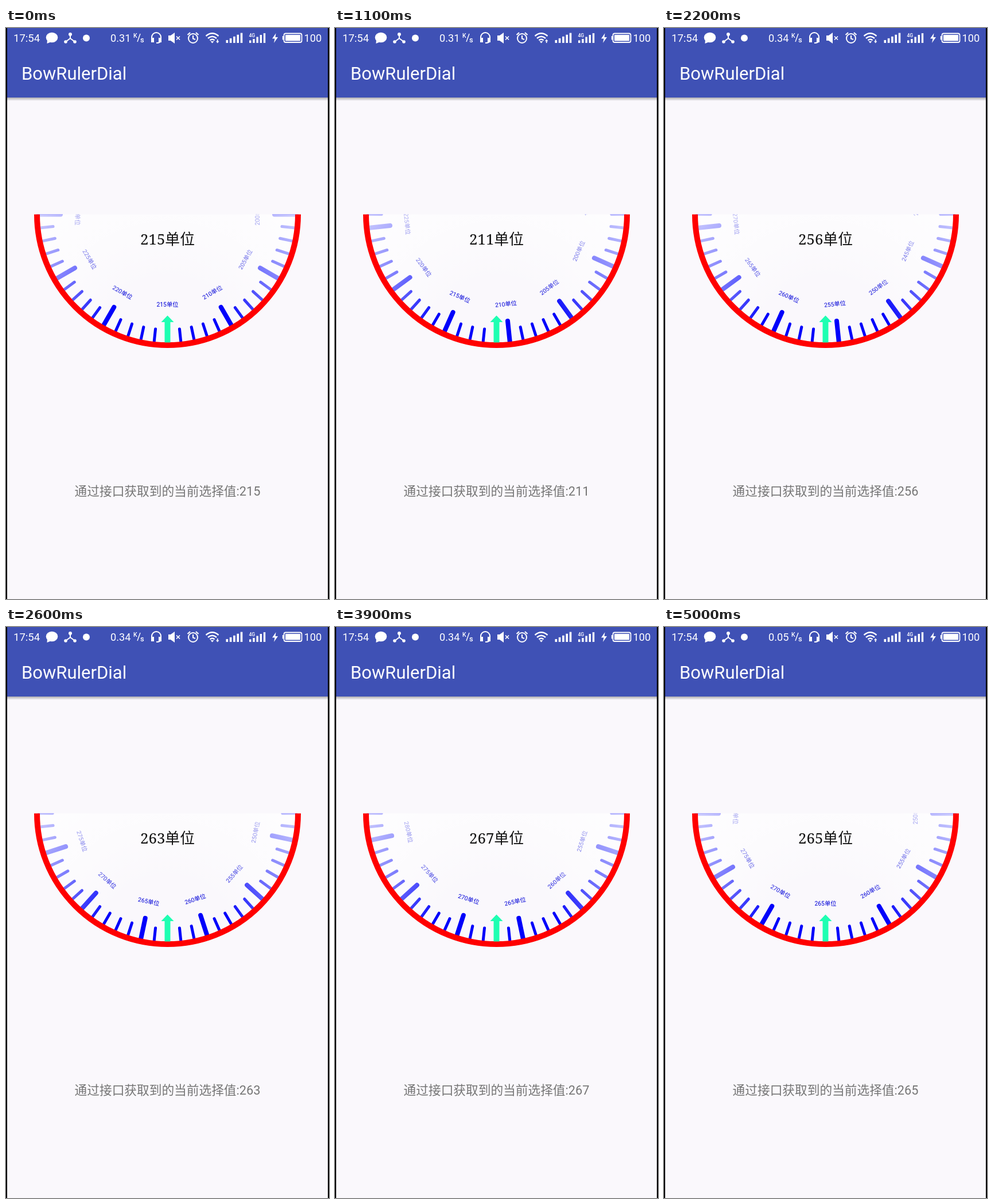
Write an HTML page with a canvas that moves like this. It is 563x994 px and loops after 5100 ms.

```html
<!DOCTYPE html>
<html lang="zh">
<head>
<meta charset="utf-8">
<style>
  html, body { margin: 0; width: 100%; height: 100%; overflow: hidden; background: #000; }
  canvas { display: block; }
</style>
</head>
<body>
<canvas id="stage" width="563" height="994"></canvas>
<script>
const ctx = document.getElementById('stage').getContext('2d');
const LOOP = 5100, CX = 281.5, CY = 324.5, RADIUS = 232.5, UNIT = '单位';
const SANS = 'Roboto, "Noto Sans CJK SC", "Noto Sans CJK", sans-serif';
const SERIF = '"Noto Serif", "Noto Sans CJK SC", "Noto Sans CJK", serif';

// Drag path of the dial: [time, value], sampled every 100 ms.
const drag = [[0, 215], [200, 215], [700, 203.5], [1100, 211], [1600, 224], [2200, 256],
  [2600, 263], [3200, 269], [3600, 269], [3700, 268], [3800, 268], [3900, 267],
  [4400, 267], [4500, 266], [4900, 266], [5000, 265], [5100, 265]];

function valueAt(time) {
  const t = Math.floor(time / 100) * 100;
  const i = drag.findIndex(p => p[0] > t);
  const [t0, v0] = drag[i - 1], [t1, v1] = drag[i];
  return Math.round(v0 + (v1 - v0) * (t - t0) / (t1 - t0));
}

function text(str, x, y, size, color, align = 'left', family = SANS, weight = 400) {
  ctx.font = `${weight} ${size}px ${family}`;
  ctx.fillStyle = color;
  ctx.textAlign = align;
  ctx.fillText(str, x, y);
}

function rect(x, y, w, h, color) {
  ctx.fillStyle = color;
  ctx.fillRect(x, y, w, h);
}

function disc(x, y, r, ry = r) {
  ctx.beginPath();
  ctx.ellipse(x, y, r, ry, 0, 0, Math.PI * 2);
  ctx.fill();
}

function shape(d) { ctx.fill(new Path2D(d)); }

function line(d, width) {
  ctx.lineWidth = width;
  ctx.stroke(new Path2D(d));
}

function bars(x, y, step) {
  for (let i = 0; i < 5; i++) {
    const h = 5 + i * step;
    ctx.fillRect(x + i * 6.3, y - h, 3.6, h);
  }
}

function drawStatus(t) {
  const speed = t < 1800 ? '0.31' : t < 4800 ? '0.34' : '0.05';
  const arrow = t < 900 ? 'down' : t < 1800 ? 'up' : t < 2800 ? 'down' : t < 4800 ? '' : 'up';
  const white = '#fff';
  text('17:54', 13, 24, 18.5, white);
  text(speed, 182, 24, 18.2, white);
  text('K', 222, 17, 10.5, white, 'left', SANS, 500);
  text('s', 234, 25, 13, white, 'left', SANS, 500);
  text('4G', 423.5, 16, 8.5, white, 'left', SANS, 500);
  text('100', 519.5, 24, 18.3, white);
  ctx.strokeStyle = white;
  ctx.lineCap = 'butt';
  line('M229 24L234 10', 1.4);

  // chat, nodes, plug
  disc(80, 16.5, 10.3, 8.7);
  shape('M72 20L71.5 27L79 24Z');
  line('M112 11V18L104 24M112 18L120 24', 2);
  disc(112, 11, 3);
  disc(104, 24, 2.8);
  disc(120, 24, 2.8);
  disc(140, 17.5, 6);

  // headset, muted speaker, alarm
  line('M254 19V16A8 8 0 0 1 270 16V19M270 21Q270 26 262 26', 2);
  ctx.fillRect(253, 17, 5, 8);
  ctx.fillRect(266, 17, 5, 8);
  shape('M283 13H287L294 8V27L287 22H283Z');
  line('M297 14.5L303 20.5M303 14.5L297 20.5', 1.7);
  line('M334 18A8 8 0 1 1 318 18A8 8 0 1 1 334 18M326 13V18.5L330 20', 2);
  line('M316.5 12L321 8M335.5 12L331 8', 2.2);

  // wifi
  line('M348.5 14Q359.5 4.5 370.5 14M352 18Q359.5 11.5 367 18M355.5 21.5Q359.5 18 363.5 21.5', 2.4);
  shape('M356.5 23L359.5 26.5L362.5 23Z');
  if (arrow === 'up') shape('M366 23L368.7 19.5L371.4 23H369.6V26H367.8V23Z');
  if (arrow === 'down') shape('M366 23L368.7 26.5L371.4 23H369.6V20H367.8V23Z');

  // signals, bolt, battery
  bars(383.5, 26, 3.1);
  ctx.fillRect(424, 21.5, 3.4, 4.5);
  ctx.fillRect(430.2, 19, 3.4, 7);
  ctx.fillRect(436.4, 15.5, 3.4, 10.5);
  ctx.fillRect(442.6, 12, 3.4, 14);
  ctx.fillRect(448.8, 9, 3.4, 17);
  shape('M470.5 9L464 18.5H468.5L467 26L474 16H469.5Z');
  ctx.lineWidth = 1.8;
  ctx.beginPath();
  ctx.roundRect(484.5, 9.5, 31, 15.5, 3);
  ctx.stroke();
  ctx.fillRect(487, 12, 26, 10.5);
  ctx.fillRect(481.8, 14, 2, 6.5);
}

function drawDial(value) {
  ctx.save();
  ctx.beginPath();
  ctx.rect(0, CY, 563, 240);
  ctx.clip();

  ctx.save();
  ctx.translate(CX, CY);
  ctx.strokeStyle = '#0000fb';
  ctx.lineCap = 'round';
  for (let v = value - 18; v <= value + 18; v++) {
    const major = v % 5 === 0;
    ctx.save();
    ctx.rotate((v - value) * Math.PI / 30);
    line(`M0 ${major ? 186.5 : 200.5}V224`, major ? 8 : 5);
    if (major) text(v + UNIT, 0, 160.5, 10.3, '#0000d8', 'center');
    ctx.restore();
  }
  ctx.restore();

  // white veil growing with distance from the pointer
  const veil = ctx.createRadialGradient(CX, 557, 115, CX, 557, 320);
  [[0, 0], [0.29, 0.3], [0.5, 0.49], [1, 0.8]].forEach(([stop, alpha]) =>
    veil.addColorStop(stop, `rgba(255,255,255,${alpha})`));
  ctx.fillStyle = veil;
  disc(CX, CY, RADIUS - 5);

  ctx.strokeStyle = '#f00';
  ctx.lineWidth = 10;
  ctx.beginPath();
  ctx.arc(CX, CY, RADIUS - 5, 0, Math.PI * 2);
  ctx.stroke();
  ctx.restore();

  ctx.fillStyle = '#1effb2';
  shape('M281.5 500.5L292.5 512H286.5V547.5H276.5V512H270.5Z');
  text(value + UNIT, CX, 376.5, 25.8, '#111', 'center', SERIF);
}

function draw(t) {
  const value = valueAt(t);
  rect(0, 0, 563, 994, '#000');
  rect(2, 0, 559, 994, '#faf8fc');
  const shadow = ctx.createLinearGradient(0, 121, 0, 127);
  shadow.addColorStop(0, 'rgba(0,0,0,.3)');
  shadow.addColorStop(1, 'rgba(0,0,0,0)');
  rect(2, 121, 559, 6, shadow);
  rect(2, 0, 559, 121, '#3f51b5');
  drawStatus(t);
  text('BowRulerDial', 27, 90, 31, '#fff');
  drawDial(value);
  text('通过接口获取到的当前选择值:' + value, CX, 814, 21.7, '#757575', 'center');
}

function tick() {
  draw(performance.now() % LOOP);
  requestAnimationFrame(tick);
}
tick();
</script>
</body>
</html>
```
